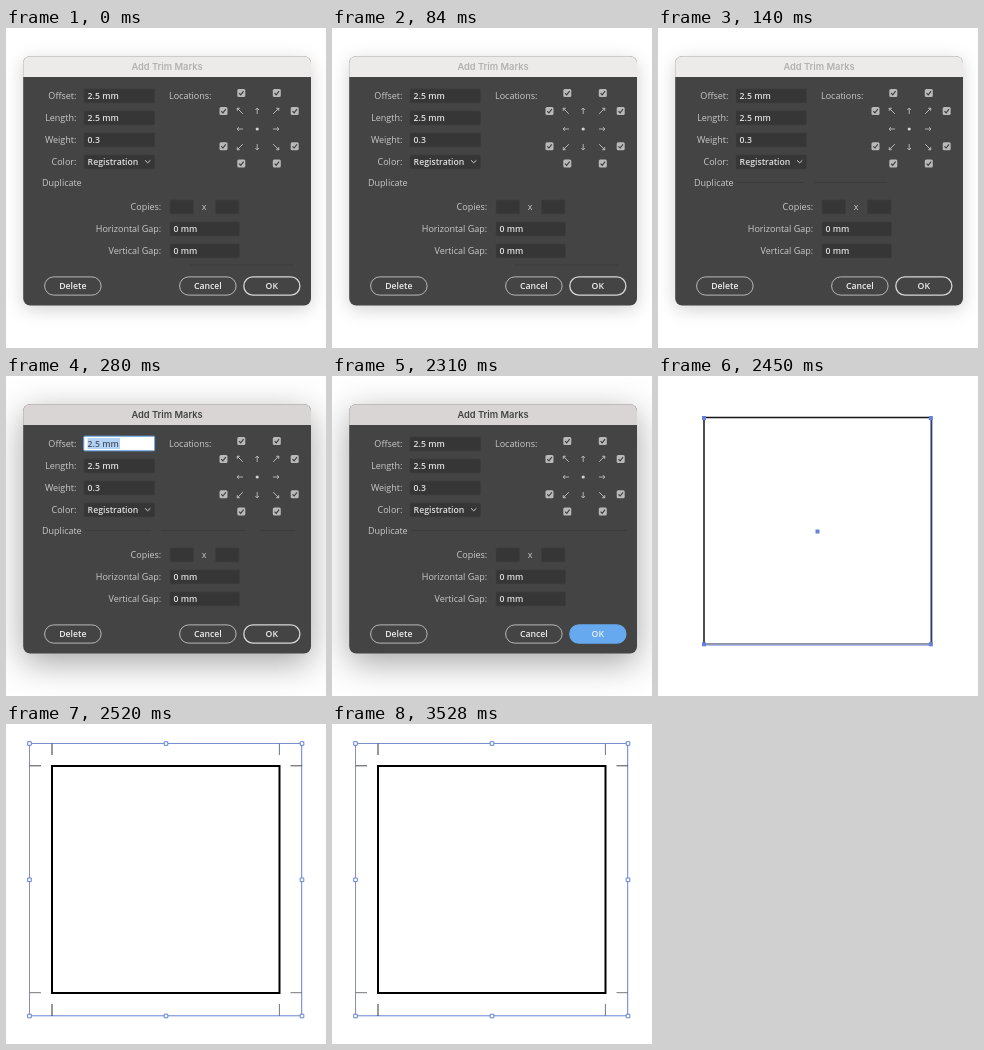
An HTML page with a canvas that plays this animation: 320x320 px, repeating every 4.2 s.

```html
<!DOCTYPE html>
<html lang="en">
<head>
<meta charset="utf-8">
<title>Trim marks</title>
<style>
html, body { margin: 0; width: 100%; height: 100%; overflow: hidden; background: #fff; }
canvas { display: block; width: 320px; height: 320px; }
</style>
</head>
<body>
<canvas id="stage"></canvas>
<script>
const canvas = document.getElementById('stage');
const ctx = canvas.getContext('2d');
const ratio = window.devicePixelRatio || 1;
canvas.width = canvas.height = 320 * ratio;

const LOOP = 4200;
const UI = '"Open Sans", "Noto Sans", sans-serif';
const TITLE = 'Inter, "Liberation Sans", sans-serif';
const BLUE = '#6482d8';

function text(str, x, y, color, align = 'left', font = `9px ${UI}`) {
  ctx.font = font;
  ctx.textAlign = align;
  ctx.fillStyle = color;
  ctx.fillText(str, x, y);
}

function box(x, y, w, h, r, fill, stroke, width = 1) {
  ctx.beginPath();
  ctx.roundRect(x, y, w, h, r);
  if (fill) { ctx.fillStyle = fill; ctx.fill(); }
  if (stroke) { ctx.strokeStyle = stroke; ctx.lineWidth = width; ctx.stroke(); }
}

function path(points, color, width = 1) {
  ctx.beginPath();
  points.forEach(([x, y], i) => i ? ctx.lineTo(x, y) : ctx.moveTo(x, y));
  ctx.strokeStyle = color;
  ctx.lineWidth = width;
  ctx.stroke();
}

function line(x1, y1, x2, y2, color, width) {
  path([[x1, y1], [x2, y2]], color, width);
}

function label(str, right, y) {
  text(str, right, y, '#c9c9c9', 'right');
}

function fieldText(str, x, y, color) {
  text(str, x + 4.6, y + 11.2, color, 'left', `600 8.7px ${UI}`);
}

function field(x, y, w, value) {
  box(x + 1, y + 0.9, w - 1.6, 14, 1, '#363636', '#3e3e3e', 0.8);
  fieldText(value, x, y, '#dedede');
}

function focusedField(x, y, w, value) {
  box(x + 0.8, y + 0.2, w - 1.2, 14.6, 1, '#fff', '#6aa5e6');
  ctx.fillStyle = '#b3d3f6';
  ctx.fillRect(x + 4.5, y + 2, 32.5, 11);
  fieldText(value, x, y, '#4a5462');
}

function checkbox(x, y) {
  box(x - 4, y - 4, 8, 8, 1.5, '#b9b9b9');
  path([[x - 2.2, y + 0.1], [x - 0.6, y + 1.8], [x + 2.3, y - 1.9]], '#3c3c3c', 1.1);
}

function arrow(x, y, dx, dy) {
  ctx.save();
  ctx.translate(x, y);
  ctx.rotate(Math.atan2(dy, dx));
  const r = dx && dy ? 4 : 3;
  line(-r, 0, r, 0, '#bcbcbc', 0.9);
  path([[r - 2, -1.8], [r, 0], [r - 2, 1.8]], '#bcbcbc', 0.9);
  ctx.restore();
}

function button(str, x, w, isDefault, pressed) {
  const edge = pressed ? '#66a9ef' : isDefault ? '#d6d6d6' : '#c4c4c4';
  box(x + 0.6, 248.9, w - 1.5, 18.2, 9.1, pressed ? edge : null, edge, isDefault ? 1.3 : 0.9);
  text(str, x + w / 2 - 0.2, 261.2, '#efefef', 'center', `600 8.7px ${UI}`);
}

function locations() {
  for (const x of [235.3, 270.8]) for (const y of [65, 135.6]) checkbox(x, y);
  for (const x of [217.5, 288.7]) for (const y of [83, 118.2]) checkbox(x, y);
  for (let dy = -1; dy <= 1; dy++) {
    for (let dx = -1; dx <= 1; dx++) {
      const x = 252 + dx * 18 - (dx ? 0 : 0.8), y = 101 + dy * 18;
      if (dx || dy) arrow(x, y, dx, dy);
      else box(x - 1.6, y - 1.6, 3.2, 3.2, 1.6, '#d2d2d2');
    }
  }
}

function panel(active) {
  ctx.save();
  ctx.shadowColor = active ? 'rgba(0,0,0,.36)' : 'rgba(0,0,0,.18)';
  ctx.shadowBlur = (active ? 34 : 18) * ratio;
  ctx.shadowOffsetY = (active ? 9 : 4) * ratio;
  box(17.2, 28.2, 287.8, 249.4, 7, '#444');
  ctx.restore();
  box(17.2, 28.2, 287.8, 20.8, [7, 7, 0, 0], active ? '#d9d5d5' : '#edeaea');
  text('Add Trim Marks', 161, 42, active ? '#444' : '#b3b0b0', 'center', `600 9.3px ${TITLE}`);
}

function dialog({ active, focus, pressed, rules }) {
  panel(active);
  label('Offset:', 70.4, 71.2);
  label('Length:', 70.4, 93.2);
  label('Weight:', 70.4, 115.2);
  label('Color:', 70.4, 137.2);
  (focus ? focusedField : field)(77, 60, 72, '2.5 mm');
  field(77, 82, 72, '2.5 mm');
  field(77, 104, 72, '0.3');
  field(77, 126, 72, 'Registration');
  path([[139, 132.3], [141.7, 134.8], [144.4, 132.3]], '#cfcfcf');

  text('Locations:', 163, 71.2, '#c9c9c9');
  locations();

  text('Duplicate', 36, 158, '#c9c9c9');
  for (const [from, to, y = 154.5] of rules) line(from, y, to, y, '#3b3b3b');
  label('Copies:', 155.2, 182.2);
  field(163, 171, 25, '');
  text('x', 198.2, 182.2, '#c9c9c9', 'center');
  field(208.5, 171, 25, '');
  label('Horizontal Gap:', 155.2, 204.2);
  field(163, 193, 71, '0 mm');
  label('Vertical Gap:', 155.2, 226.2);
  field(163, 215, 71, '0 mm');

  button('Delete', 38, 58);
  button('Cancel', 173, 58);
  button('OK', 237.2, 57.6, true, pressed);
}

function selectedSquare() {
  line(45, 41.5, 274, 41.5, '#161616', 1.7);
  line(46, 41, 46, 269, '#303030', 1.7);
  line(273.4, 41, 273.4, 269, '#2d3c74', 1.9);
  line(45, 268, 274, 268, '#252d49', 1.2);
  line(45, 269.2, 274, 269.2, '#8ea5e2', 1);
  for (const [x, y] of [[46, 42], [272.8, 42], [46, 268.3], [272.8, 268.3], [159.5, 155.5]]) {
    ctx.fillStyle = BLUE;
    ctx.fillRect(x - 2, y - 2, 4, 4);
  }
}

function markedSquare() {
  ctx.strokeStyle = '#000';
  ctx.lineWidth = 2;
  ctx.strokeRect(46, 42, 227.5, 227);

  line(23.5, 19.5, 296, 19.5, '#7890cc');
  line(23.5, 19.5, 23.5, 292, '#8590b4');
  line(295.7, 19.5, 295.7, 292, BLUE);
  line(23.5, 291.8, 296, 291.8, BLUE);

  for (const [y1, y2] of [[19.5, 31], [280, 292]]) {
    line(46, y1, 46, y2, '#333');
    line(273.4, y1, 273.4, y2, '#6d7692');
  }
  for (const [x1, x2] of [[23.5, 35], [284.5, 296]]) {
    line(x1, 41.8, x2, 41.8, '#4a4a4a');
    line(x1, 268.7, x2, 268.7, '#777');
  }

  for (const x of [23.5, 160, 296]) {
    for (const y of [19.5, 155.8, 292]) {
      if (x !== 160 || y !== 155.8) box(x - 1.8, y - 1.8, 3.6, 3.6, 0, '#fff', BLUE);
    }
  }
}

const scenes = [
  [140, () => dialog({ rules: [[183, 287, 237]] })],
  [280, () => dialog({ rules: [[78, 146], [156, 229]] })],
  [2310, () => dialog({ active: true, focus: true, rules: [[79, 145], [155, 240], [254, 289]] })],
  [2450, () => dialog({ active: true, pressed: true, rules: [[79, 295]] })],
  [2520, selectedSquare],
  [LOOP, markedSquare]
];

let shown;
const start = performance.now();

function tick() {
  const t = (performance.now() - start) % LOOP;
  const scene = scenes.find(([end]) => t < end);
  if (scene !== shown) {
    shown = scene;
    ctx.setTransform(ratio, 0, 0, ratio, 0, 0);
    ctx.fillStyle = '#fff';
    ctx.fillRect(0, 0, 320, 320);
    scene[1]();
  }
  requestAnimationFrame(tick);
}
tick();
</script>
</body>
</html>
```
